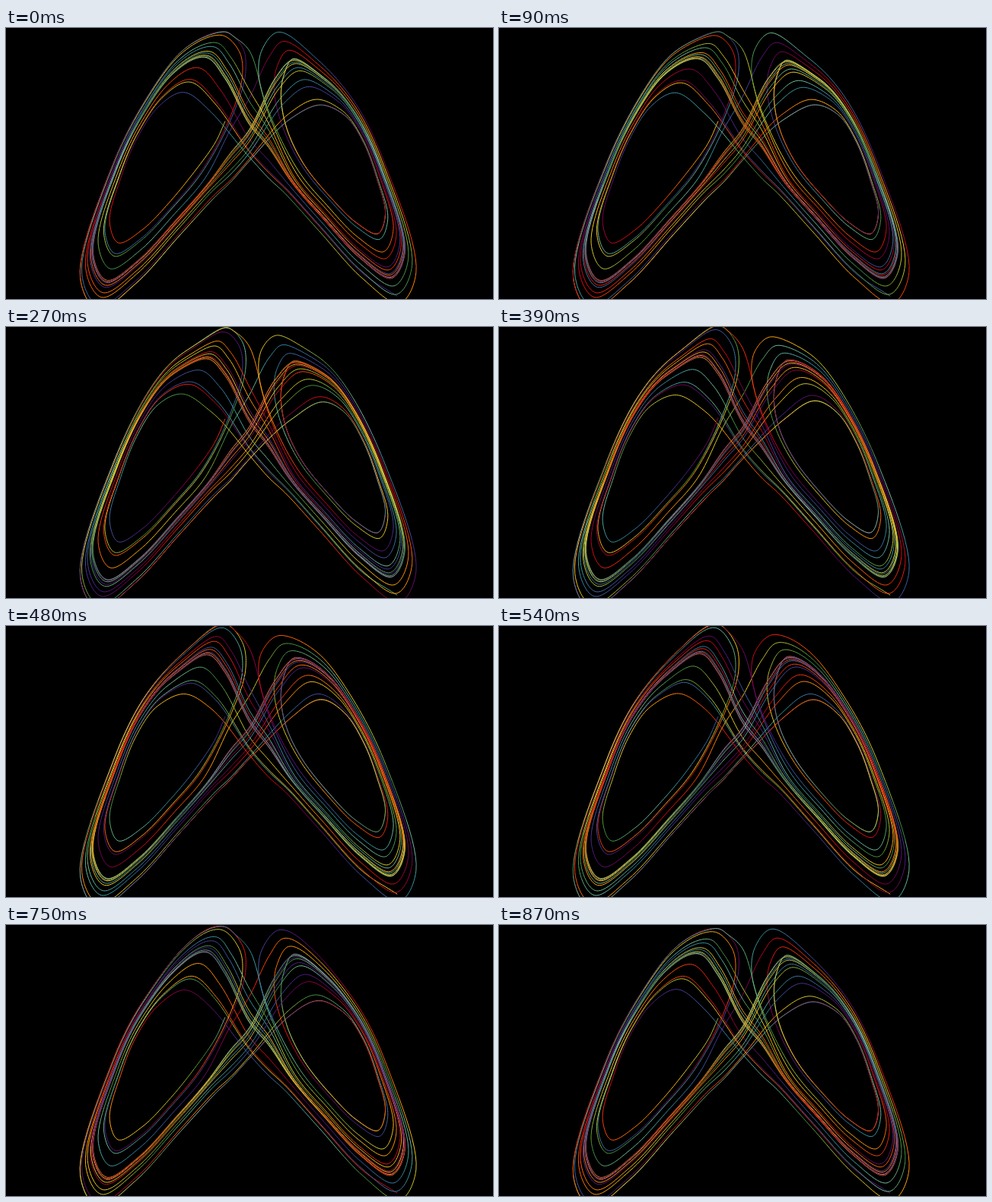
Write an HTML page with a canvas that moves like this. It is 640 px wide and 357 px high and loops after 0.9 s.

```html
<!DOCTYPE html>
<html lang="en">
<head>
<meta charset="utf-8">
<title>Butterfly attractor</title>
<style>
  html, body { margin: 0; width: 100%; height: 100%; overflow: hidden; background: #000; }
  canvas { display: block; }
</style>
</head>
<body>
<canvas id="stage" width="640" height="357"></canvas>
<script>
const ctx = document.getElementById('stage').getContext('2d');
const LOOP = 900, STEP = 30, CENTER = 320;
const NEAR = 272, FAR = 372;   // lowest points of the smallest and the largest loop
const HUE_LENGTH = 745;        // px of path per colour cycle
const WAVE_LENGTH = 125;

// Wings visited, last loop first.
const WINGS = 'LRRLRLRLRLRRLRLRLRLRLRRLLRLRRLLR';

// Smallest and largest loop: top, outer side, lowest point, diagonal.
const INNER = [[93, 98], [125, 114], [150, 152], [168, 200], [179, 246], [169, 272], [140, 257], [105, 222], [70, 178]];
const OUTER = [[32, 0], [85, 30], [135, 90], [180, 180], [223, 330], [200, 372], [150, 338], [90, 272], [45, 223]];

// One colour cycle in equal steps.
const PALETTE = ['#b4be32', '#f0c81e', '#ff9605', '#fa4b05', '#dc0a14', '#78004b',
  '#4b1e82', '#3c5fa0', '#32919b', '#73be9b', '#3c8c3c']
  .map(c => [1, 3, 5].map(i => parseInt(c.slice(i, i + 2), 16)));

const mix = (a, b, k) => a + (b - a) * k;
const blend = (p, q, k) => p.map((v, i) => mix(v, q[i], k));
const outline = low => INNER.map((p, i) => blend(p, OUTER[i], (low - NEAR) / (FAR - NEAR)));

// Each loop follows from the next one by the inverse return map.
function buildRoute() {
  const route = [];
  let low = 283;
  for (let i = 0; i < WINGS.length; i++) {
    if (i) low = WINGS[i] === WINGS[i - 1] ? NEAR + .72 * (low - 331) : 303 + .67 * (FAR - low);
    route.unshift({ side: WINGS[i] === 'L' ? -1 : 1, low });
  }
  return route;
}

function buildKnots(route) {
  const knots = [];
  const add = (side, x, y) => knots.push([CENTER + side * x, y]);
  route.forEach(({ side, low }, i) => {
    outline(low).slice(i ? 0 : 5).forEach(p => add(side, ...p));
    const next = route[i + 1];
    if (!next) {
      add(side, 45, 150);
      add(side, 32, 121);
    } else if (next.side === side) {          // turn back into the same wing
      const k = (low - NEAR) / 28, x = 40 - 34 * k;
      add(side, 48 - 22 * k, 133 - 12 * k);
      add(side, x, 92 - 32 * k);
      add(side, x + 4, 62 - 38 * k);
    } else {                                  // cross to the other wing
      const d = low - 303, y = 188 - 163 * Math.exp(-d / 27);
      const [tx, ty] = outline(next.low)[0];
      add(side, 25, y + 28 + 62 * Math.exp(-d / 9));
      add(side, 0, y);
      add(next.side, .58 * tx, mix(y, ty, .72));
    }
  });
  return knots;
}

// Centripetal Catmull-Rom curve.
function smooth(p, n) {
  const out = [];
  const gap = (a, b) => Math.sqrt(Math.hypot(a[0] - b[0], a[1] - b[1])) || 1;
  for (let i = 0; i < p.length - 1; i++) {
    const b = p[i], c = p[i + 1];
    const a = p[i - 1] || blend(c, b, 2), d = p[i + 2] || blend(b, c, 2);
    const r = gap(a, b), s = gap(b, c), t = gap(c, d);
    for (let j = 0; j < n; j++) {
      const u = j / n, v = 1 - u;
      out.push([0, 1].map(k => {
        const m = s * ((b[k] - a[k]) / r - (c[k] - a[k]) / (r + s) + (c[k] - b[k]) / s);
        const w = s * ((c[k] - b[k]) / s - (d[k] - b[k]) / (s + t) + (d[k] - c[k]) / t);
        return b[k] * (1 + 2 * u) * v * v + m * u * v * v + c[k] * u * u * (3 - 2 * u) - w * u * u * v;
      }));
    }
  }
  out.push(p[p.length - 1]);
  return out;
}

const path = smooth(buildKnots(buildRoute()), 12);

// Colour phase from the path length to the free end, with a slow drift.
const phase = [];
for (let i = path.length - 1, d = 0; i >= 0; i--) {
  const [x, y] = path[i], [nx, ny] = path[i + 1] || path[i];
  d += Math.hypot(nx - x, ny - y) / HUE_LENGTH;
  phase[i] = d + .5 / (1 + Math.exp(2 * (3.6 - d)));
}

const COLORS = Array.from({ length: 128 }, (_, n) => {
  const u = n / 128 * PALETTE.length, i = Math.floor(u);
  return `rgb(${blend(PALETTE[i], PALETTE[(i + 1) % PALETTE.length], u - i).map(Math.round)})`;
});

// The upper part sways; the lower part stays still.
function sway(x, y, t) {
  const size = 4 * Math.min(1, Math.max(0, 1 - y / 230));
  return y + size * Math.cos(2 * Math.PI * (t - .38 + (x - 245) / WAVE_LENGTH));
}

function draw(t) {
  ctx.fillStyle = '#000';
  ctx.fillRect(0, 0, 640, 357);
  ctx.lineWidth = 1;
  const ys = path.map(([x, y]) => sway(x, y, t));
  for (let i = 0; i < path.length - 1; i += 2) {
    ctx.strokeStyle = COLORS[Math.floor((phase[i] + t) % 1 * 128)];
    ctx.beginPath();
    ctx.moveTo(path[i][0], ys[i]);
    for (let j = i + 1; j <= i + 2 && j < path.length; j++) ctx.lineTo(path[j][0], ys[j]);
    ctx.stroke();
  }
}

const start = performance.now();
let shown = -1;
function tick() {
  const step = Math.floor((performance.now() - start) % LOOP / STEP);
  if (step !== shown) draw((shown = step) * STEP / LOOP);
  requestAnimationFrame(tick);
}
tick();
</script>
</body>
</html>
```
